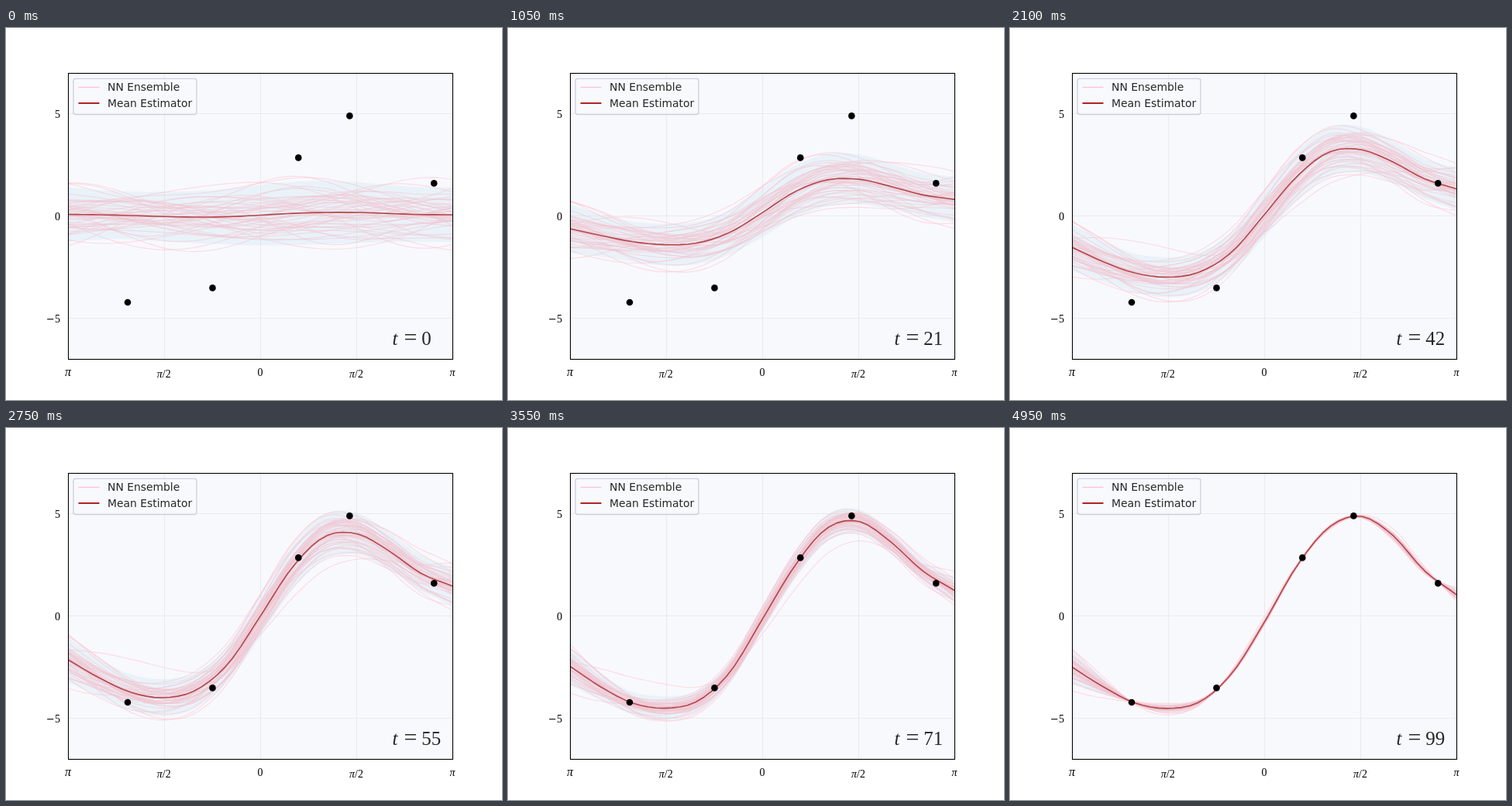
Animation of 640x480 px, one loop 5 s. Source, as an HTML page:

```html
<!DOCTYPE html>
<html lang="en">
<head>
<meta charset="utf-8">
<title>Ensemble training</title>
<style>
html, body { margin: 0; width: 100%; height: 100%; overflow: hidden; background: #fff; }
svg { display: block; width: 640px; height: 480px; }
.tick { font: 14px "Liberation Serif", serif; }
.it { font-style: italic; }
.legend { font: 13.89px "DejaVu Sans", sans-serif; fill: #262626; }
.time { font: 25px "Liberation Serif", serif; fill: #262626; }
</style>
</head>
<body>
<svg viewBox="0 0 640 480">
  <defs><clipPath id="area"><rect x="80" y="57.6" width="496" height="369.6"/></clipPath></defs>
  <rect x="80" y="58" width="496" height="369.5" fill="#f8f9fd"/>
  <path d="M204.5 58V427M328.5 58V427M452.5 58V427M80 110.5H576M80 242.5H576M80 374.5H576" stroke="#ebebeb" stroke-width="1.1"/>
  <g clip-path="url(#area)" fill="none" stroke-linejoin="round">
    <g id="members" stroke="#ffc0cb" stroke-opacity=".5" stroke-width="1.2"></g>
    <path id="mean" stroke="#b22222" stroke-width="1.6"/>
    <path id="band" fill="#add8e6" fill-opacity=".2"/>
  </g>
  <g id="dots"></g>
  <rect x="80.5" y="58.5" width="496" height="369" fill="none" stroke="#000" stroke-width="1.1"/>

  <rect x="87" y="65.3" width="159" height="46.2" rx="2.8" fill="#f8f9fd" fill-opacity=".8" stroke="#cfcfdd" stroke-width="1.3"/>
  <path d="M93.5 76.5H120.5" stroke="#ffc0cb" stroke-width="1.2"/>
  <path d="M93.5 97H120.5" stroke="#b22222" stroke-width="2"/>
  <text class="legend" x="131" y="81">NN Ensemble</text>
  <text class="legend" x="131" y="102">Mean Estimator</text>

  <g class="tick" text-anchor="middle">
    <text class="it" x="80" y="448.5" font-size="16">π</text>
    <text x="203.8" y="450.5"><tspan class="it">π</tspan>/2</text>
    <text x="328" y="448.5">0</text>
    <text x="452" y="450.5"><tspan class="it">π</tspan>/2</text>
    <text class="it" x="576" y="448.5">π</text>
  </g>
  <g class="tick" text-anchor="end">
    <text x="70" y="116">5</text>
    <text x="70" y="248">0</text>
    <text x="70" y="380"><tspan font-family="DejaVu Sans, sans-serif" font-size="13">−</tspan>5</text>
  </g>
  <g class="time">
    <text class="it" x="498.5" y="408.5">t</text>
    <text x="513.5" y="409" font-size="30" style="font-size:30px">=</text>
    <text id="step" x="536.2" y="408.5">0</text>
  </g>
</svg>
<script>
const NS = 'http://www.w3.org/2000/svg';
const $ = id => document.getElementById(id);
const COUNT = 50, POINTS = 50, STEPS = 100, STEP_MS = 50;
const UNIT = 26.4, XUNIT = 248 / Math.PI, LENGTH = 1.15, SIGMA = 0.68;

const range = (n, f) => Array.from({ length: n }, (_, i) => f(i));
const sum = list => list.reduce((a, b) => a + b, 0);
const px = x => 328 + x * XUNIT;

function add(parent, tag, attrs) {
  const el = document.createElementNS(NS, tag);
  for (const k in attrs) el.setAttribute(k, attrs[k]);
  return parent.appendChild(el);
}

// Smooth curve through unevenly spaced knots (cubic Hermite).
function curve(xs, ys, x) {
  const last = xs.length - 1;
  const slope = i => {
    const a = Math.max(0, i - 1), b = Math.min(last, i + 1);
    return (ys[b] - ys[a]) / (xs[b] - xs[a]);
  };
  let i = 0;
  while (i < last - 1 && x > xs[i + 1]) i++;
  const h = xs[i + 1] - xs[i], u = (x - xs[i]) / h, v = 1 - u;
  return ys[i] * v * v * (1 + 2 * u) + ys[i + 1] * u * u * (3 - 2 * u)
    + h * u * v * (slope(i) * v - slope(i + 1) * u);
}

let seed = 20;
function random() {
  seed = (seed + 0x6D2B79F5) | 0;
  let r = Math.imul(seed ^ (seed >>> 15), 1 | seed);
  r = (r + Math.imul(r ^ (r >>> 7), 61 | r)) ^ r;
  return ((r ^ (r >>> 14)) >>> 0) / 4294967296;
}
const normal = () => Math.sqrt(-2 * Math.log(1 - random())) * Math.cos(2 * Math.PI * random());

// Mean height in pixels at thirteen even places, per training step.
const times = [0, 13, 29, 42, 55, 71, 99];
const knots = range(13, i => 80 + i * 496 / 12);
const means = [
  [240.5, 241, 242, 243.3, 244, 243.5, 241.5, 239.3, 238, 238, 239.3, 240.7, 241],
  [251, 257, 262.3, 265, 264.2, 255.5, 238.5, 221.5, 211.5, 210.9, 217.5, 224.5, 228],
  [267.5, 280, 290.5, 295, 290.5, 272, 239, 203, 181.7, 179.8, 191.5, 206.5, 215],
  [283, 302, 316.5, 321.5, 314.5, 288.5, 241, 192.5, 160.5, 156.8, 172.5, 194.5, 207.5],
  [299, 323, 341.5, 348, 338, 304, 243, 180, 140.5, 136.3, 158, 187, 204],
  [307.5, 335, 355.5, 361.5, 352, 314.5, 247, 179, 130, 120.3, 146.5, 184, 209.5],
  [308.5, 334.5, 355.3, 361.8, 353, 316, 251, 179.3, 129, 113.8, 138, 184, 215]
];
const spread = [1, 0.85, 0.77, 0.73, 0.65, 0.36, 0.03];
const lagging = [0.4, 0.6, 0.8, 0.95, 1, 0.78, 0.05];

const data = [[157, 354], [266.5, 335.4], [377.3, 167.4], [443.4, 113.4], [552.3, 200.4]];
const dataX = data.map(p => (p[0] - 328) / XUNIT);
const gridX = range(POINTS, i => -Math.PI + 2 * Math.PI * i / (POINTS - 1));

const kernel = (a, b) => Math.exp(-((a - b) ** 2) / (2 * LENGTH ** 2));

function solve(rhs) {
  const n = rhs.length;
  const m = dataX.map((a, i) => [...dataX.map((b, j) => kernel(a, b) + (i === j ? 1e-5 : 0)), rhs[i]]);
  for (let c = 0; c < n; c++) {
    for (let r = 0; r < n; r++) {
      if (r === c) continue;
      const f = m[r][c] / m[c][c];
      for (let k = c; k <= n; k++) m[r][k] -= f * m[c][k];
    }
  }
  return m.map((row, i) => row[n] / row[i]);
}

function randomCurve() {
  const n = 24, amp = SIGMA * Math.sqrt(2 / n);
  const waves = range(n, () => [normal() / LENGTH, random() * 2 * Math.PI]);
  return x => amp * sum(waves.map(([w, p]) => Math.cos(w * x + p)));
}
const bump = (height, mid, width) => x => height * Math.exp(-((x - mid) ** 2) / (2 * width ** 2));

// Each member splits into a part the data removes and a part it leaves free.
const starts = [
  x => -1.6 * Math.cos(1.1 * (x - 0.9)),
  bump(1.9, 0.5, 1),
  bump(-1.5, -2.6, 1.2),
  ...range(COUNT - 3, randomCurve)
];
const members = starts.map((f, i) => {
  const weights = solve(dataX.map(f));
  const fit = gridX.map(x => sum(weights.map((w, j) => w * kernel(x, dataX[j]))));
  return {
    fit,
    free: gridX.map((x, k) => f(x) - fit[k]),
    rate: i ? spread : lagging,
    path: add($('members'), 'path', {})
  };
});

data.forEach(([cx, cy]) => add($('dots'), 'circle', { cx, cy, r: 4.3 }));

const points = ys => ys.map((y, i) => px(gridX[i]).toFixed(2) + ' ' + y.toFixed(2));
const line = ys => 'M' + points(ys).join('L');

function draw(t) {
  const heights = knots.map((_, k) => curve(times, means.map(row => row[k]), t));
  const mean = gridX.map(x => curve(knots, heights, px(x)));
  const devs = members.map(m => {
    const s = curve(times, m.rate, t);
    return m.fit.map((v, k) => m.free[k] + s * v);
  });
  const mid = gridX.map((_, k) => sum(devs.map(d => d[k])) / COUNT);
  const width = gridX.map((_, k) =>
    2 * UNIT * Math.sqrt(sum(devs.map(d => (d[k] - mid[k]) ** 2)) / COUNT));

  members.forEach((m, i) =>
    m.path.setAttribute('d', line(mean.map((y, k) => y - UNIT * (devs[i][k] - mid[k])))));
  $('mean').setAttribute('d', line(mean));
  const top = points(mean.map((y, k) => y - width[k]));
  const low = points(mean.map((y, k) => y + width[k])).reverse();
  $('band').setAttribute('d', 'M' + [...top, ...low].join('L') + 'Z');
  $('step').textContent = t;
}

const began = performance.now();
let shown = -1;
function tick() {
  const t = Math.floor((performance.now() - began) / STEP_MS) % STEPS;
  if (t !== shown) draw(shown = t);
  requestAnimationFrame(tick);
}
tick();
</script>
</body>
</html>
```
